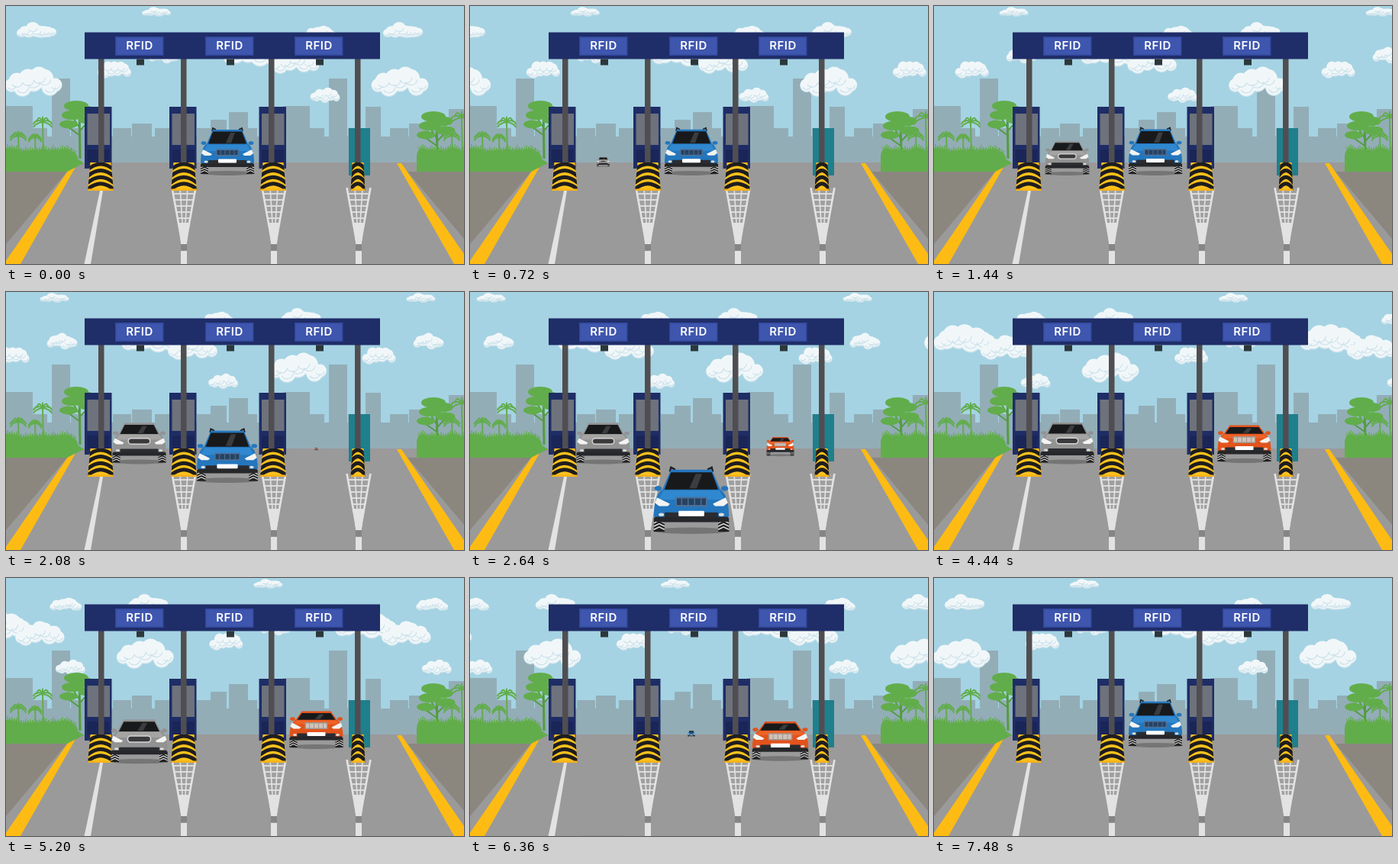
Animation of 600x338 px, one loop 7520 ms. Source, as an HTML page with a canvas:

```html
<!DOCTYPE html>
<html lang="en">
<head>
<meta charset="utf-8">
<title>Toll plaza</title>
<style>
  html, body { margin: 0; width: 100%; height: 100%; overflow: hidden; background: #a5d3e3; }
  canvas { display: block; }
  .sign {
    position: absolute; top: 40px; width: 64px; height: 25px;
    font: 600 15px/24px Inter, "Open Sans", sans-serif; letter-spacing: .5px;
    color: #fff; text-align: center;
  }
</style>
</head>
<body>
<canvas id="stage" width="600" height="338"></canvas>
<div class="sign" style="left:143px">RFID</div>
<div class="sign" style="left:261px">RFID</div>
<div class="sign" style="left:378px">RFID</div>
<script>
const ctx = document.getElementById('stage').getContext('2d');
const LOOP = 7520, STEP = 40;

function rect(x, y, w, h, color) {
  ctx.fillStyle = color;
  ctx.fillRect(x, y, w, h);
}
function trace(pts) {
  ctx.beginPath();
  for (let i = 0; i < pts.length; i += 2) ctx.lineTo(pts[i], pts[i + 1]);
}
function poly(color, ...pts) {
  trace(pts);
  ctx.closePath();
  ctx.fillStyle = color;
  ctx.fill();
}
function line(color, width, ...pts) {
  trace(pts);
  ctx.strokeStyle = color;
  ctx.lineWidth = width;
  ctx.stroke();
}
function oval(x, y, rx, ry, color) {
  ctx.beginPath();
  ctx.ellipse(x, y, rx, ry, 0, 0, Math.PI * 2);
  ctx.fillStyle = color;
  ctx.fill();
}
// symmetric trapezoid around x
function taper(color, x, top, topHalf, bottom, bottomHalf) {
  poly(color, x - topHalf, top, x + topHalf, top, x + bottomHalf, bottom, x - bottomHalf, bottom);
}
function bar(color, half, top, bottom, r = 0) {
  ctx.beginPath();
  ctx.roundRect(-half, top, half * 2, bottom - top, r);
  ctx.fillStyle = color;
  ctx.fill();
}
function mirrored(axis, draw) {
  for (const side of [1, -1]) {
    ctx.save();
    ctx.translate(axis, 0);
    ctx.scale(side, 1);
    draw();
    ctx.restore();
  }
}
function seeded(seed) {
  return () => (seed = (seed * 16807 + 11) % 2147483647) / 2147483647;
}

// ---- sky -------------------------------------------------------------
const CITY = '#93adb7', CITY_TILE = 363, SKY_TILE = 480;

// left, width, top of the towers that stand out
const TOWERS = [
  [0, 35, 131], [60, 24, 95], [108, 20, 132],
  [165, 26, 154], [217, 20, 135], [292, 25, 139]
];
function skyline() {
  rect(0, 171, 600, 36, CITY);
  for (const shift of [0, CITY_TILE]) {
    for (const [x, w, top] of TOWERS) rect(x + shift, top, w, 207 - top, CITY);
    for (let x = 30; x < 330; x += 55) rect(x + shift, 160, 24, 40, CITY);
    rect(268 + shift, 149, 21, 40, CITY);
  }
}

// x, y, width; the clouds nearer the top are flatter
const CLOUDS = [
  [197, 7, 36], [40, 31, 50], [412, 34, 40], [36, 98, 72],
  [142, 83, 42], [325, 59, 78], [378, 72, 62], [207, 64, 38], [418, 116, 37]
];
function cloud(x, y, w) {
  const h = w * Math.min(.58, .28 + y / 160);
  const rnd = seeded(y * 977 + w);
  const puffs = Array.from({ length: 9 }, (_, i) => {
    const u = i / 4 - 1;
    const dome = Math.sqrt(1.05 - u * u);
    return [u * .4 * w, h * (.2 - .36 * dome * rnd()), w * (.1 + .07 * dome), h * (.17 + .14 * dome)];
  });
  for (const [dx, dy, rx, ry] of puffs) oval(x + dx, y + dy + .5, rx + .4, ry + .4, '#cfe4ec');
  for (const [dx, dy, rx, ry] of puffs) oval(x + dx, y + dy - .5, rx, ry, '#f1f7f9');
  for (const [dx, dy, rx, ry] of puffs) {
    ctx.beginPath();
    ctx.ellipse(x + dx, y + dy, rx * .7, ry * .65, 0, .1, 2.6);
    ctx.strokeStyle = '#cde2eb';
    ctx.lineWidth = 1.2;
    ctx.stroke();
  }
}
function clouds(t) {
  const shift = SKY_TILE * t / (LOOP - STEP);
  for (const [x, y, w] of CLOUDS)
    for (let k = -1; k < 3; k++) cloud(x - shift + k * SKY_TILE, y, w);
}

// ---- plants ----------------------------------------------------------
const GREEN = '#62ad4b', DEEP = '#539c42';

function palm(x, top, size) {
  line(GREEN, 2, x, top, x + 1, 200);
  for (let i = 0; i < 7; i++) {
    const a = Math.PI * (.9 + i * .2);
    const dx = Math.cos(a) * size, dy = Math.sin(a) * size * .8;
    ctx.beginPath();
    ctx.moveTo(x, top);
    ctx.quadraticCurveTo(x + dx * .7, top + dy - 2, x + dx, top + dy * .6 + 5);
    ctx.stroke();
  }
}
function tree(x, y) {
  line(DEEP, 3, x, y, x + 1, 200);
  for (let i = 0; i < 5; i++) {
    const side = i % 2 ? 1 : -1, dx = side * (4 + i * 2.5);
    line(DEEP, 2, x, y + 18 + i * 5, x + dx, y + i * 7);
    oval(x + dx, y + i * 6, 16 - i, 7 - i * .4, GREEN);
  }
}
function bushes(from, to) {
  const rnd = seeded(from + 7);
  for (let x = from; x <= to; x += 6) {
    const y = 190 + 6 * rnd();
    oval(x, y + 6, 8, 10, GREEN);
    for (let i = -2; i < 3; i++) line(GREEN, 1.3, x, y + 4, x + i * 3, y - 9 + Math.abs(i) * 2);
  }
}
function plants() {
  tree(96, 131);
  palm(16, 170, 11);
  palm(38, 172, 9);
  palm(48, 152, 13);
  bushes(2, 86);
  poly(GREEN, 0, 196, 88, 196, 102, 206, 80, 217, 0, 217);
  tree(564, 145);
  palm(597, 146, 15);
  palm(584, 170, 11);
  bushes(546, 600);
  rect(538, 196, 62, 21, GREEN);
}

// ---- road ------------------------------------------------------------
const WHITE = '#e2e2e2';

function marking(x) {
  const top = 238, tip = 310;
  const half = y => 16.5 - 13.5 * (y - top) / (tip - top);
  taper('#a0a0a0', x, top, 16.5, tip, 3);
  for (const side of [-1, 1]) {
    line(WHITE, 2.6, x + side * 15.5, top, x + side * 2.5, tip);
    line(WHITE, 1.6, x + side * 5, top, x + side, 300);
  }
  for (let y = 246; y < 290; y += 8) line(WHITE, 1.8, x - half(y), y, x + half(y), y);
  taper(WHITE, x, 284, 7, 312, 3.8);
  rect(x - 4, 312, 8, 8, '#858585');
  rect(x - 4, 321, 8, 17, WHITE);
}
function road() {
  rect(0, 205, 600, 133, '#9a9a9a');
  mirrored(303, () => {
    poly('#8b877f', -303, 217, -223, 217, -303, 312);
    poly('#fdbb14', -215, 206, -209, 206, -284, 338, -306, 338);
  });
  poly(WHITE, 123, 242, 127, 242, 111, 338, 102.5, 338);
  [233, 351, 462].forEach(marking);
}

// ---- toll gate -------------------------------------------------------
function booth(x) {
  rect(x, 132, 35.5, 81, '#1f2d66');
  rect(x + 3.5, 141, 29.5, 41, '#6d727c');
  rect(x + 3.5, 188, 29.5, 17, '#1a2658');
}
function bumper(x, top, base) {
  ctx.save();
  trace([x - top, 205, x + top, 205, x + base, 242, x - base, 242]);
  ctx.closePath();
  ctx.clip();
  rect(x - base, 205, base * 2, 37, '#fcc21c');
  ctx.strokeStyle = '#1e1d1f';
  ctx.lineWidth = 5;
  for (let y = 207; y < 240; y += 8.6) {
    ctx.beginPath();
    ctx.moveTo(x - base - 1, y + 8);
    ctx.quadraticCurveTo(x - base * .5, y, x, y);
    ctx.quadraticCurveTo(x + base * .5, y, x + base + 1, y + 8);
    ctx.stroke();
  }
  rect(x - base, 239.5, base * 2, 3, '#f6b31a');
  ctx.restore();
}
function gate() {
  [103, 214, 331.5].forEach(booth);
  rect(449, 160, 28, 62, '#1f7f8c');
  for (const x of [121, 229, 344, 457]) rect(x, 69, 7.5, 142, '#504e51');
  rect(103, 34.5, 387, 35, '#1f2d68');
  for (const x of [143, 261, 378]) {
    rect(x, 40, 63.5, 25, '#3349a0');
    rect(x + 1.5, 41.5, 60.5, 22, '#3f56ae');
    rect(x + 28, 69.5, 10, 8, '#2c373b');
  }
  for (const x of [124, 233, 350]) bumper(x, 13.5, 17);
  bumper(461, 7.5, 9.5);
}

// ---- cars (origin at bottom centre) ----------------------------------
// x, base: place at the booth; come, stop: arrival; go: departure
const CARS = [
  { x: 174.5, base: 224.5, tall: 53, paint: '#929292', hood: '#a5a4a3', grille: '#3a3a3c', trim: '#d5d5d5', oval: true,
    come: 430, stop: 1660, go: 5080, speed: 148, grow: .46 },
  { x: 406.5, base: 223, tall: 48, paint: '#e2531c', hood: '#ee6428', grille: '#cfc4bc', trim: '#a2938b', plate: true,
    come: 2000, stop: 3240, go: 6260, speed: 156, grow: .42 },
  { x: 290, base: 221, tall: 59, paint: '#2476bd', hood: '#2f88d0', grille: '#27415f', trim: '#4b719a', plate: true, rails: true,
    come: 6190, stop: 7480, go: 9366, speed: 119, grow: .66 }
];

function wheels() {
  oval(0, -2, 36, 3, 'rgba(60,60,60,.4)');
  mirrored(0, () => {
    rect(25, -14, 10, 13, '#222');
    for (let y = -9; y < 0; y += 3) line('#ddd', 1.1, 25, y, 30, y - 2.5, 35, y);
  });
}
function body(c) {
  const top = -c.tall, sill = top * .33 - 21, nose = sill + 5;
  bar('#26272a', 34, -20, -10, 3);
  mirrored(0, () => {
    if (c.rails) line('#202124', 1.8, 20, top + 2, 19, top - 2, 15, top);
    oval(31, sill - 1, 3.4, 2.4, c.paint);
  });
  ctx.beginPath();
  ctx.moveTo(-19, top);
  ctx.lineTo(19, top);
  ctx.lineTo(27, sill);
  ctx.quadraticCurveTo(35, nose, 35, -15);
  ctx.lineTo(-35, -15);
  ctx.quadraticCurveTo(-35, nose, -27, sill);
  ctx.fillStyle = c.paint;
  ctx.fill();
  taper('#18191b', 0, top + 2.5, 19, sill, 25);
  poly('#3a3c40', 4, top + 4, 10, top + 4, 5, sill - 1, -2, sill - 1);
  taper(c.hood, 0, sill + 1, 26, -31, 31);
  bar(c.trim, 15, -33.5, -24.5, c.oval ? 5 : 1);
  bar(c.grille, 13.5, -32, -26, c.oval ? 3 : 0);
  if (!c.oval) for (let x = -9; x < 10; x += 6) line(c.trim, 1, x, -32, x, -26);
  mirrored(0, () => {
    poly('#f4f4f2', 20, -27, 32, -33, 34, -28, 30, -25, 22, -25);
    oval(28, -17, 2.5, 1.5, '#ddd');
  });
  bar('#2a2c30', 25, -19, -14.5, 1);
  if (c.plate) bar('#fff', 12, -20.5, -15.5, 1);
}
function car(c, now) {
  const t = now < c.come ? now + LOOP : now;
  let scale = 1, y = c.base;
  if (t < c.stop) {
    scale = (t - c.come) / (c.stop - c.come);
    y = 206 + (c.base - 206) * scale;
  } else if (t > c.go) {
    const run = c.speed * (t - c.go) / 1000;
    // the size grows quickly at first, then levels off
    scale = 1 + c.grow * (1 - (1 - Math.min(run / 220, 1)) ** 1.7);
    y = c.base + run;
  }
  if (scale < .03 || y - 64 * scale > 338) return;
  ctx.save();
  ctx.translate(c.x, y);
  ctx.scale(scale, scale);
  wheels();
  ctx.translate(0, .5 * Math.sin(now * Math.PI * 2 / 376));
  body(c);
  ctx.restore();
}

function draw(t) {
  rect(0, 0, 600, 338, '#a5d3e3');
  skyline();
  clouds(t);
  road();
  plants();
  gate();
  for (const c of CARS) car(c, t);
}

const start = performance.now();
function tick() {
  const t = (performance.now() - start) % LOOP;
  draw(Math.floor(t / STEP) * STEP);
  requestAnimationFrame(tick);
}
tick();
</script>
</body>
</html>
```
